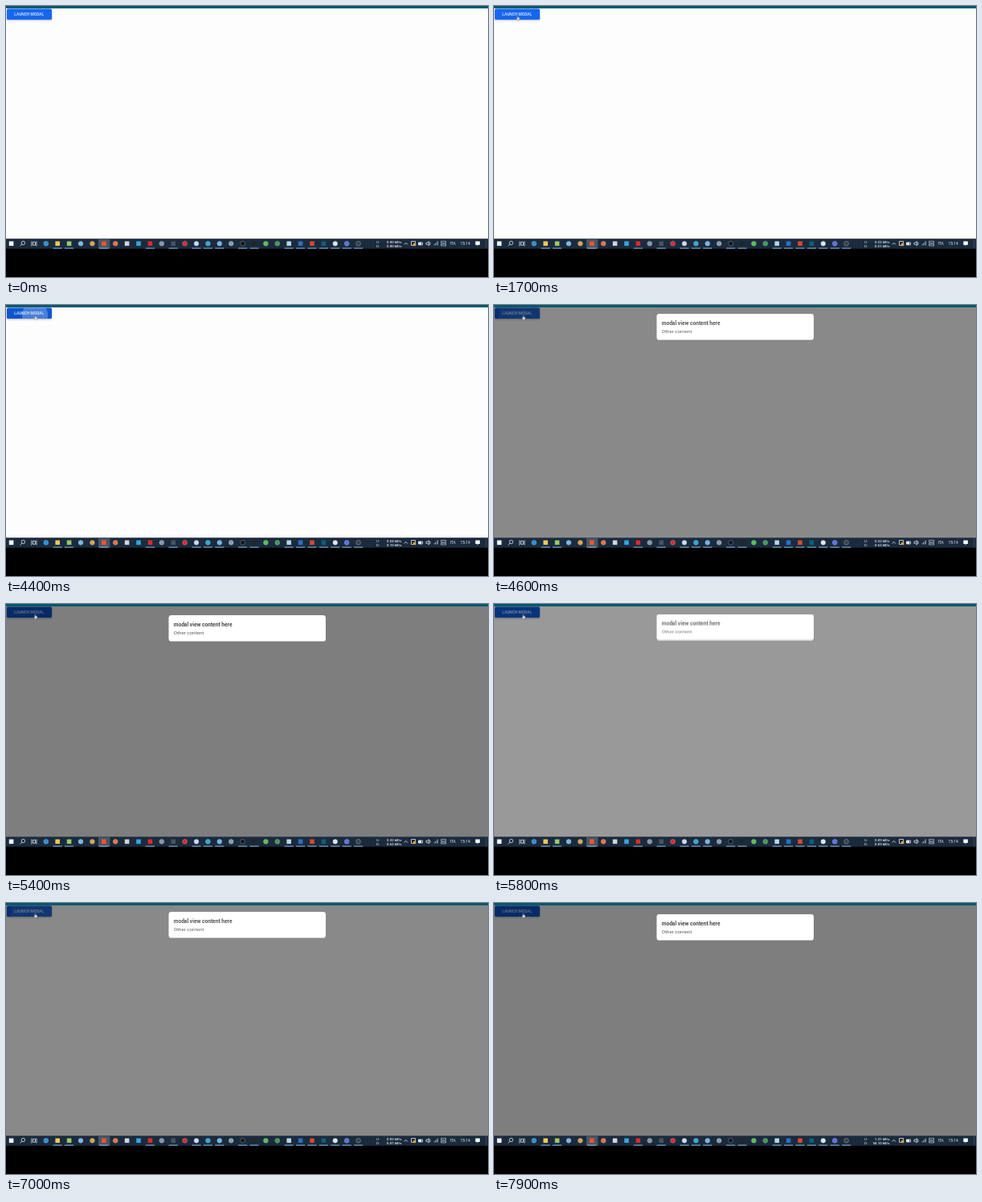
These frames come from a looping animation (600 px wide and 338 px high, 8000 ms). An HTML page:

```html
<!DOCTYPE html>
<html lang="en">
<head>
<meta charset="utf-8">
<title>Modal demo</title>
<style>
  html, body { margin: 0; width: 100%; height: 100%; overflow: hidden; background: #000; }
  svg { display: block; width: 100vw; height: 100vh; }
  text { font-family: Roboto, Arial, sans-serif; }
  #button, #ripple, #overlay, #modal, #pointer { animation: 8s linear infinite; }

  #button { fill: #1266f1; animation-name: hover; }
  @keyframes hover {
    0%, 37.5% { fill: #1266f1; }
    40%, 100% { fill: #0c56d0; }
  }

  #ripple { transform-origin: 36px 13px; animation-name: ripple; }
  @keyframes ripple {
    0%, 53.7% { transform: scale(0); opacity: 0; }
    53.75% { transform: scale(0); opacity: .3; }
    55% { transform: scale(.6); opacity: .25; }
    59%, 83.7% { transform: scale(1.4); opacity: 0; }
    83.72% { transform: scale(0); opacity: 0; }
    83.75% { transform: scale(0); opacity: .3; }
    85% { transform: scale(.6); opacity: .25; }
    89%, 100% { transform: scale(1.4); opacity: 0; }
  }

  #overlay { animation-name: fade; animation-timing-function: step-end; }
  @keyframes fade {
    0%, 55% { opacity: 0; }
    56.25% { opacity: .5; }
    57.5% { opacity: .92; }
    58.75% { opacity: 1; }
    72.5% { opacity: .79; }
    73.75% { opacity: .3; }
    75% { opacity: 0; }
    85% { opacity: .01; }
    86.25% { opacity: .5; }
    87.5% { opacity: .92; }
    88.75%, 100% { opacity: 1; }
  }

  #modal { animation-name: drop; animation-timing-function: step-end; }
  @keyframes drop {
    0% { transform: translateY(-15px); }
    56.25% { transform: translateY(-8px); }
    57.5% { transform: translateY(-3px); }
    58.75% { transform: none; }
    72.5% { transform: translateY(-1.5px); }
    73.75% { transform: translateY(-7px); }
    75% { transform: translateY(-15px); }
    86.25% { transform: translateY(-8px); }
    87.5% { transform: translateY(-3px); }
    88.75%, 100% { transform: none; }
  }

  #pointer { animation-name: point; }
  @keyframes point {
    0%, 4.9% { transform: translate(90px, 70px); opacity: 0; }
    5% { transform: translate(90px, 70px); opacity: 1; }
    10% { transform: translate(35px, 10px); }
    16% { transform: translate(26px, 11px); }
    21%, 30% { transform: translate(29.5px, 12.5px); }
    38%, 100% { transform: translate(36.5px, 13.2px); opacity: 1; }
  }
</style>
</head>
<body>
<svg viewBox="0 0 600 338" preserveAspectRatio="none">
  <defs>
    <clipPath id="face"><rect x="1" y="3.4" width="56" height="13.6" rx="1.6"/></clipPath>
    <filter id="soft" x="-20%" y="-40%" width="140%" height="200%">
      <feDropShadow dx="0" dy=".9" stdDeviation="1" flood-opacity=".3"/>
    </filter>
  </defs>

  <rect width="600" height="338"/>
  <rect y="3" width="600" height="287.5" fill="#fdfdfe"/>

  <rect id="button" x="1" y="3.4" width="56" height="13.6" rx="1.6" filter="url(#soft)"/>
  <g clip-path="url(#face)"><circle id="ripple" cx="36" cy="13" r="27" fill="#fff"/></g>
  <text x="10.3" y="12.3" font-size="4.85" font-weight="500" fill="#fff" fill-opacity=".9">LAUNCH MODAL</text>

  <g id="overlay">
    <rect y="3" width="600" height="287.5" fill-opacity=".5"/>
    <g id="modal">
      <rect x="202.5" y="14" width="195.5" height="32.6" rx="3.4" fill="#fff"/>
      <text x="208.7" y="27.8" font-size="6.62" font-weight="700" fill="#484848">modal view content here</text>
      <text x="208.7" y="37.8" font-size="6.2" fill="#5a5a5a">Other content</text>
    </g>
  </g>

  <rect width="600" height="3" fill="#02596f"/>

  <g id="taskbar">
    <rect y="290.5" width="600" height="12.2" fill="#1a2b3e"/>
    <rect x="115" y="290.5" width="14.4" height="12.2" fill="#485666"/>
    <g id="apps"></g>
    <g fill="none" stroke="#e8edf2" stroke-width=".8">
      <circle cx="21.4" cy="295.5" r="2.2"/>
      <path d="M19.8 297.2l-2.2 2.3M31.8 293.5v6M33.5 294.3h3v4h-3zM38 293.5v6"/>
      <path d="M495.6 297.6l2.2-2.2 2.2 2.2"/>
      <path d="M504.5 293.5h5v5h-5zM513.5 295h5v3h-5z"/>
      <path d="M523 295.2h1.5l1.8-1.5v5.2l-1.8-1.5H523zM527.5 294.5q1.4 1.8 0 3.6" />
      <path d="M533 298.5v-1.5M534.5 298.5v-2.5M536 298.5v-4M537.5 298.5v-5.2" stroke="#aab4be"/>
      <path d="M541.6 293.4h6v2.4h-6zM541.6 297h6v2h-6z" stroke-width=".6"/>
    </g>
    <rect x="507" y="296" width="3.2" height="3.2" fill="#e7a33c"/>
    <path d="M513.5 295h3.5v3h-3.5z" fill="#e8edf2"/>
    <path d="M584.3 293.5h5.6v4.4h-2l-1.4 1.5v-1.5h-2.2z" fill="#f4f6f8"/>
    <path d="M597.5 290.5v12" stroke="#55616e" stroke-width=".5"/>
    <g fill="#eef2f6" font-size="4.9">
      <text x="552.6" y="298.2">ITA</text>
      <text x="565.6" y="298.2">15:14</text>
      <g font-size="4.3">
        <text x="461" y="295.6">U:</text>
        <text x="461" y="301.2">D:</text>
        <g text-anchor="end" font-weight="500">
          <text id="up" x="492.6" y="295.6"></text>
          <text id="down" x="492.6" y="301.2"></text>
        </g>
      </g>
    </g>
  </g>

  <path id="pointer" fill="#fff" stroke="#20304a" stroke-width=".35"
    d="M-.6 0Q0-.7.5 0V1.7L2 2.1Q2.4 2.3 2.3 3.2L1.8 5H-.5L-1.6 3.2Q-1.5 2.6-.6 3.1Z"/>
</svg>
<script>
  // Shape (s square, c circle), colour, and * for a running app.
  const apps = `s#f5f8fb - - c#2590d8 s#f0c75a* s#9cc76b* c#79b8e6 c#d9a441 s#f0542f*
    c#f0703a s#d8d3d8 s#35a5df s#d92b2b* c#8795a6 s#49525c* c#e0252f c#cfd8f5* c#2da5dc*
    c#6fb5e8* c#8c9cad c#11151b* s#20262a* c#55c04a c#3d9a50 s#b9d5e6* s#2b6fc4* s#d6492f*
    s#0b5f7c* c#dfe5ea* c#5a6ee8* c#3b4047*`.split(/\s+/);
  const speeds = ["0.00 0.00", "0.05 0.12", "0.22 0.51", "0.11 0.26", "0.04 0.10",
    "0.32 0.62", "0.09 0.09", "0.02 0.07", "1.31 54.10"];
  const get = id => document.getElementById(id);

  function drawApp(spec, i) {
    if (spec === "-") return "";
    const x = 6.6 + i * 14.4, fill = spec.slice(1, 8);
    const icon = spec[0] === "c"
      ? `<circle cx="${x}" cy="296.3" r="2.9" fill="${fill}" stroke="#c4ced8" stroke-width=".35"/>`
      : `<rect x="${x - 2.8}" y="293.5" width="5.6" height="5.6" fill="${fill}"/>`;
    const line = spec.endsWith("*")
      ? `<rect x="${x - 5.6}" y="301.6" width="11.2" height="1" fill="#82bde9"/>` : "";
    return icon + line;
  }
  get("apps").innerHTML = apps.map(drawApp).join("");

  function tick() {
    const t = performance.now() % 8000;
    const [up, down] = speeds[Math.floor((t + 500) / 1000)].split(" ");
    get("up").textContent = up + " kB/s";
    get("down").textContent = down + " kB/s";
    requestAnimationFrame(tick);
  }
  tick();
</script>
</body>
</html>
```
